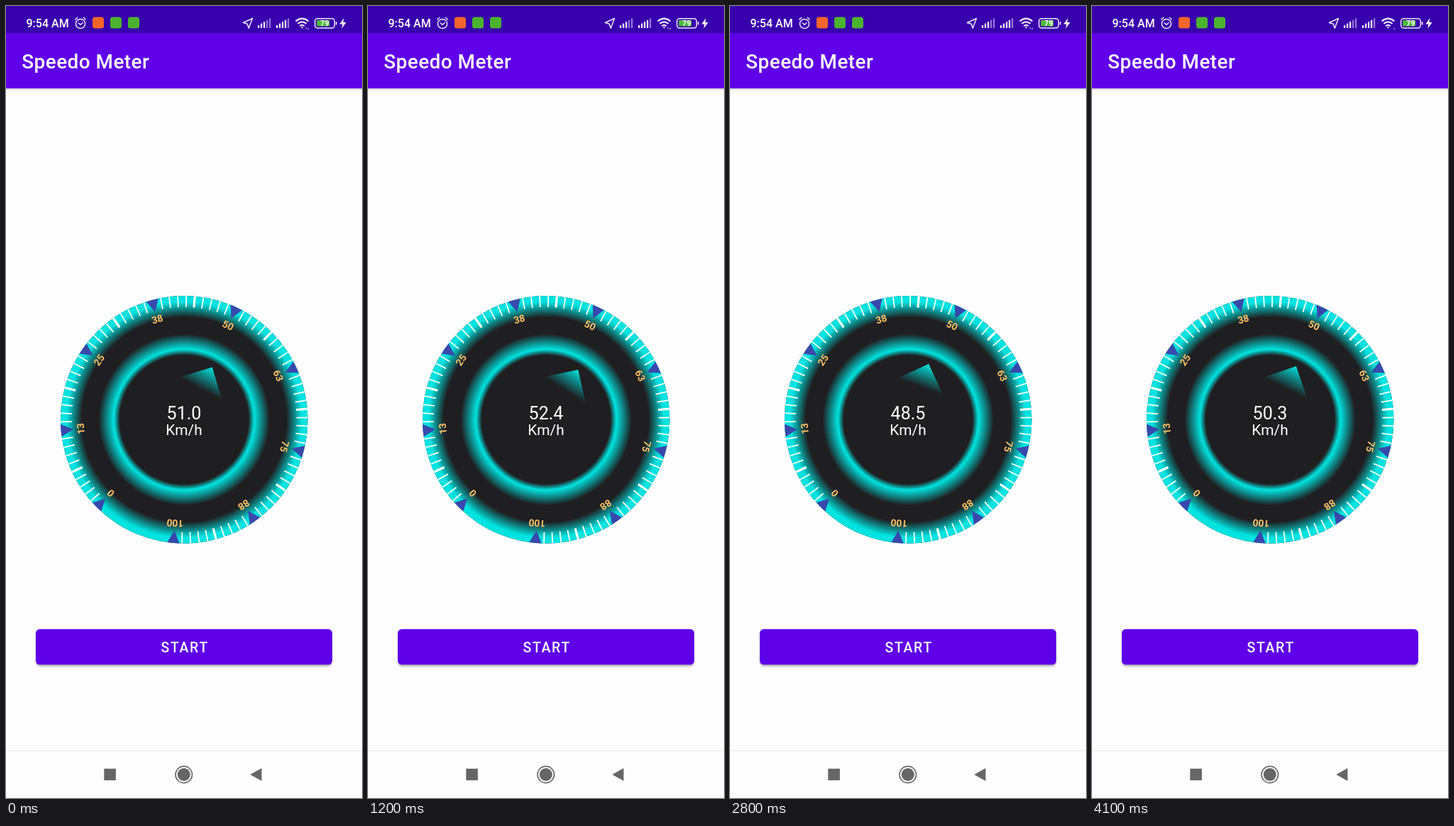
Recreate the animation shown at these times as an HTML page. Size 502 by 1115 pixels, loop 4.2 s.

```html
<!DOCTYPE html>
<html lang="en">
<head>
<meta charset="utf-8">
<title>Speedo Meter</title>
<style>
html, body { margin: 0; width: 100%; height: 100%; overflow: hidden; background: #fefdfe; }
svg { display: block; width: 502px; height: 1115px; font-family: Roboto, sans-serif; }
.mid { text-anchor: middle; }
</style>
</head>
<body>
<svg viewBox="0 0 502 1115">
  <defs>
    <radialGradient id="ring" gradientUnits="userSpaceOnUse" cx="0" cy="0" r="174.3">
      <stop offset=".52" stop-color="#1f1e20"/>
      <stop offset=".568" stop-color="#00e3e0"/>
      <stop offset=".693" stop-color="#1f1e20"/>
      <stop offset=".827" stop-color="#1f1e20"/>
      <stop offset=".952" stop-color="#00e3e0"/>
    </radialGradient>
    <linearGradient id="fade" x1="0" y1="0" x2="0" y2="1">
      <stop offset="0" stop-color="#00e3e0"/>
      <stop offset="1" stop-color="#00e3e0" stop-opacity="0"/>
    </linearGradient>
    <linearGradient id="drop" x1="0" y1="0" x2="0" y2="1">
      <stop offset="0" stop-opacity=".16"/>
      <stop offset="1" stop-opacity="0"/>
    </linearGradient>
    <filter id="soft" x="-5%" y="-20%" width="110%" height="150%"><feGaussianBlur stdDeviation="1.5"/></filter>
  </defs>

  <rect width="502" height="1115" fill="#fefdfe"/>
  <rect y="116" width="502" height="4" fill="url(#drop)"/>
  <rect y="37" width="502" height="79" fill="#5f00e8"/>
  <rect width="502" height="38" fill="#3800ad"/>
  <text x="22.3" y="88" font-size="27.9" font-weight="500" letter-spacing=".45" fill="#fff">Speedo Meter</text>

  <!-- status bar -->
  <text x="28.5" y="30" font-size="16" font-weight="500" fill="#fff">9:54 AM</text>
  <g fill="none" stroke="#eee9fa" stroke-width="1.5" stroke-linecap="round" stroke-linejoin="round">
    <circle cx="105" cy="25" r="6.6"/>
    <path d="M102.3 24l2.7 2.4 3-2.6M97.8 19l3-2.7M112.2 19l-3-2.7"/>
    <path d="M347.5 17.5L334.5 23.5l5.8 1.8 2 6z"/>
  </g>
  <rect x="122" y="15.5" width="16" height="16" rx="3.5" fill="#f4652b"/>
  <rect x="147" y="15.5" width="16" height="16" rx="3.5" fill="#4bb32f"/>
  <rect x="172" y="15.5" width="16" height="16" rx="3.5" fill="#4bb32f"/>
  <g id="bars" fill="#eee9fa"></g>
  <g fill="none" stroke="#eee9fa" stroke-width="2.1">
    <path d="M408.5 21.5q9-7.6 18 0M411.4 24.9q6.1-5.1 12.2 0M414.3 28.2q3.2-2.6 6.4 0"/>
  </g>
  <path d="M415.6 29.5h4l-2 2.2z" fill="#eee9fa"/>
  <path id="down" d="M422 30.5h2.4l-1.2 2.3z" fill="#bda9e6"/>
  <path d="M425 32.8h2.4l-1.2-2.6z" fill="#bda9e6"/>
  <rect x="435.7" y="17.7" width="27.6" height="13.2" rx="3.6" fill="none" stroke="#eee9fa" stroke-width="1.5"/>
  <rect x="438.2" y="20.1" width="18" height="8.4" rx="1.2" fill="#4fb83c"/>
  <rect x="464.8" y="22" width="1.8" height="4.6" rx=".9" fill="#eee9fa"/>
  <text class="mid" x="449.4" y="28" font-size="10.5" font-weight="700" fill="#fff">79</text>
  <path d="M476.5 17l-6 8.4h4l-1.2 6.4 6.4-8.8h-4.2z" fill="#fff"/>

  <g transform="translate(251.2 582.3)">
    <circle r="174.3" fill="#1f1e20"/>
    <circle r="174.3" fill="url(#ring)"/>
    <g id="scale"></g>
    <path id="needle" d="M0-83.7l-34.85 34.85h69.7z" fill="url(#fade)"/>
  </g>
  <text id="speed" class="mid" x="251" y="582" font-size="25.1" fill="#fff"></text>
  <text class="mid" x="251" y="604.4" font-size="20.9" fill="#fff">Km/h</text>

  <rect x="42.5" y="880" width="417" height="49.5" rx="5.5" opacity=".32" filter="url(#soft)"/>
  <rect x="42" y="877.3" width="418" height="50" rx="5.5" fill="#5f00e8"/>
  <text class="mid" x="252.3" y="910" font-size="19.5" font-weight="500" letter-spacing="1.74" fill="#fff">START</text>

  <!-- navigation bar -->
  <rect y="1048" width="502" height="1" fill="#e9e8e9"/>
  <g fill="#676667">
    <rect x="138.3" y="1073.7" width="16.6" height="16.4"/>
    <circle cx="250.8" cy="1082" r="9"/>
    <circle cx="250.8" cy="1082" r="11.7" fill="none" stroke="#676667" stroke-width="1.7"/>
    <path d="M344.3 1082l16.2-9v18z"/>
  </g>
</svg>
<script>
const LOOP = 4200, STEP = 100, SWING = 1000, OFFSET = 350;
const START = 135, SWEEP = 320;
const targets = [49.56, 52.06, 52.5, 47.03, 52.466, 49.36];
const $ = id => document.getElementById(id);

function add(parent, tag, attrs, text) {
  const el = document.createElementNS('http://www.w3.org/2000/svg', tag);
  for (const k in attrs) el.setAttribute(k, attrs[k]);
  if (text !== undefined) el.textContent = text;
  parent.appendChild(el);
}

function buildScale() {
  const scale = $('scale');
  for (let d = 0; d <= SWEEP; d += 4) {
    const transform = `rotate(${START + 90 + d})`;
    if (d % 40) {
      add(scale, 'path', { d: 'M0-174.3v15.85', stroke: '#fff', 'stroke-width': d % 20 ? 1.76 : 3.17, transform });
    } else {
      add(scale, 'path', { d: 'M0-156.9l-8.7-17.2q8.7-.5 17.4 0z', fill: '#3949ab', transform });
      add(scale, 'text', { class: 'mid', y: -141.5, 'font-size': 13.9, 'font-weight': 700, fill: '#fcc068', transform },
        Math.round(d / SWEEP * 100));
    }
  }
}

function buildBars() {
  [[355, 3], [381, 4]].forEach(([x, lit]) => {
    for (let i = 0; i < 5; i++) {
      const h = 4 + i * 2.4;
      add($('bars'), 'rect', { x: x + i * 4, y: 31 - h, width: 2.3, height: h, opacity: i < lit ? 1 : .5 });
    }
  });
}

// Each swing decelerates towards its target.
function speedAt(t) {
  const s = (t + OFFSET) / SWING, i = Math.floor(s), x = s - i;
  return targets[i] + (targets[i + 1] - targets[i]) * (1 - (1 - x) ** 2);
}

function draw(now) {
  const t = Math.floor(now % LOOP / STEP) * STEP;
  const v = speedAt(t);
  $('speed').textContent = v.toFixed(1);
  $('needle').setAttribute('transform', `rotate(${START + 90 + v / 100 * SWEEP})`);
  $('down').setAttribute('opacity', t < 4000 ? 1 : 0);
}

buildScale();
buildBars();
let origin;
function tick(now) {
  origin ??= now;
  draw(Math.max(0, now - origin));
  requestAnimationFrame(tick);
}
draw(0);
requestAnimationFrame(tick);
</script>
</body>
</html>
```
